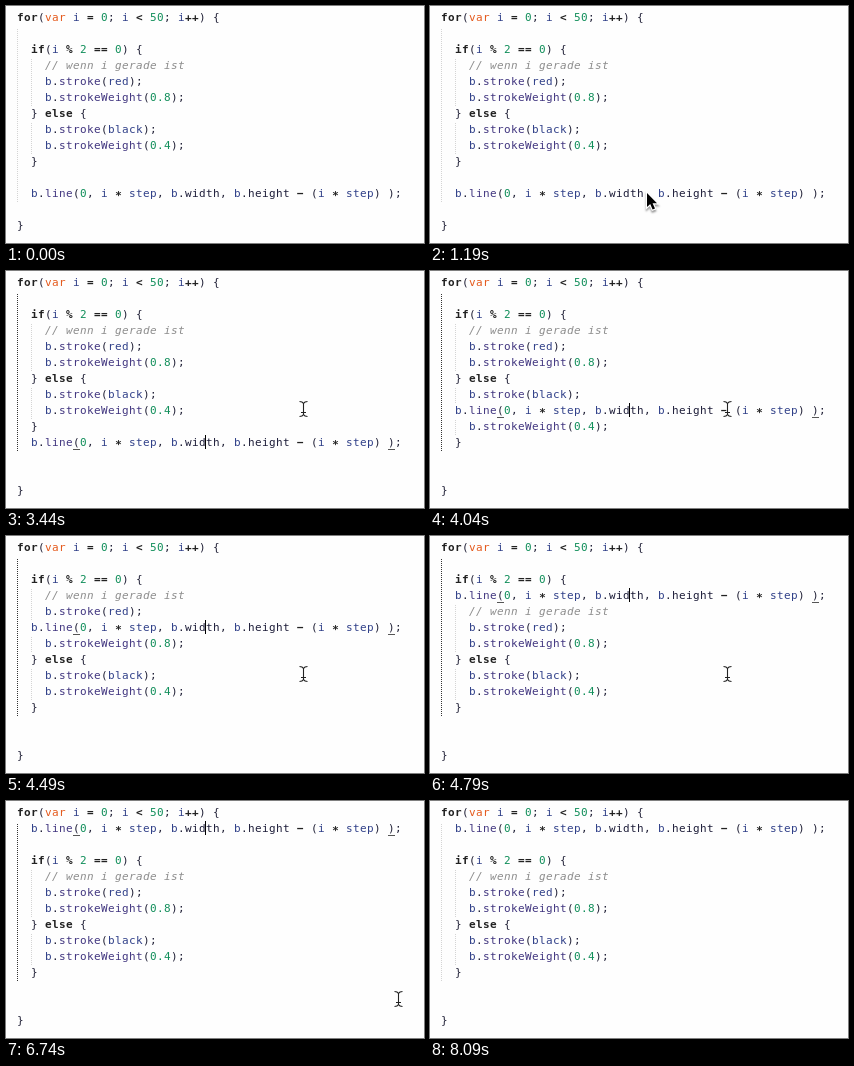
An HTML page with a canvas that plays this animation: 418x237 px, repeating every 8.19 s.

```html
<!DOCTYPE html>
<html lang="de">
<head>
<meta charset="utf-8">
<title>Moving a line of code</title>
<style>
html, body { margin: 0; width: 100%; height: 100%; overflow: hidden; background: #fefefe; }
canvas { display: block; }
</style>
</head>
<body>
<canvas id="stage" width="418" height="237"></canvas>
<script>
const ctx = document.getElementById('stage').getContext('2d');
const LOOP = 8190, STEP = 150, LEFT = 11, CHAR = 7, ROW = 16;
const CLICK = 1940, BLUR = 8090;
const FONT = '11px "DejaVu Sans Mono", monospace';

const block = `for(var i = 0; i < 50; i++) {

  if(i % 2 == 0) {
    // wenn i gerade ist
    b.stroke(red);
    b.strokeWeight(0.8);
  } else {
    b.stroke(black);
    b.strokeWeight(0.4);
  }


}`.split('\n');
const moving = '  b.line(0, i ∗ step, b.width, b.height − (i ∗ step) );';

// Token kinds: name, pattern, colour, font style
const kinds = [
  ['comment', /\/\/.*/, '#8c8c8c', 'italic'],
  ['keyword', /\b(?:for|if|else)\b/, '#222', 'bold'],
  ['storage', /\bvar\b/, '#e4581a', ''],
  ['number', /\d[\d.]*/, '#128f5b', ''],
  ['operator', /[−+∗%=<]+/, '#222', 'bold'],
  ['call', /(?<=\.)\w+(?=\()/, '#40357f', ''],
  ['property', /(?<=\.)\w+/, '#1c1c38', ''],
  ['variable', /[a-z]\w*/, '#2f3f88', ''],
  ['sign', /\S/, '#222238', '']
];
const tokens = new RegExp(kinds.map(([name, re]) => `(?<${name}>${re.source})`).join('|'), 'gi');

// Key presses that lift the line: [first press, repeats]
const presses = [[3440, 1], [3890, 7], [5090, 2]];

// Pointer moves: [start, end, x, y]
const entry = [150, 201];
const glides = [
  [590, 1040, 236, 200], [1040, 1490, 209, 182], [1490, 1640, 200, 187], [CLICK, 2540, 297, 138],
  [6440, 7040, 406, 206], [7040, 7340, 398, 203], [7490, 7940, 390, 246]
];

const arrow = new Path2D('M0 0V14L3.2 11 5.6 16.5 8 15.5 5.6 10.2H10Z');
const beam = new Path2D('M-3.5-7.5Q-.5-7.5 .5-5.5Q1.5-7.5 4.5-7.5M.5-6V6M-3.5 7.5Q-.5 7.5 .5 5.5Q1.5 7.5 4.5 7.5M-2 3.5H3');

const clamp = (v, min, max) => Math.min(max, Math.max(min, v));
const rowTop = r => 4 + ROW * r;

function rect(color, x, y, w, h) {
  ctx.fillStyle = color;
  ctx.fillRect(x, y, w, h);
}

function dots(color, x, from, to) {
  for (let y = from; y < to; y += 2) rect(color, x, y, 1, 1);
}

// Every character sits in its own cell of the editor grid
function drawCode(text, row) {
  for (const m of text.matchAll(tokens)) {
    const [, , color, style] = kinds.find(([name]) => m.groups[name]);
    ctx.font = `${style} ${FONT}`;
    ctx.fillStyle = color;
    [...m[0]].forEach((c, i) => ctx.fillText(c, LEFT + CHAR * (m.index + i), rowTop(row) + 11));
  }
}

function drawGuides(lines, end, active) {
  dots(active ? '#333' : '#d4d4d4', LEFT, 23, end);
  lines.forEach((line, r) => {
    if (line.startsWith('    ')) dots('#d4d4d4', LEFT + 2 * CHAR, rowTop(r) + 1, rowTop(r + 1));
  });
}

function pointerAt(t) {
  let [x, y] = entry;
  for (const [start, end, toX, toY] of glides) {
    const k = 1 - (1 - clamp((t - start) / (end - start), 0, 1)) ** 3;
    x += (toX - x) * k;
    y += (toY - y) * k;
  }
  return [Math.round(x), Math.round(y)];
}

function drawPointer(t) {
  if (t < 590) return;
  const isArrow = t < 1640;
  const shape = isArrow ? arrow : beam;
  ctx.save();
  ctx.translate(...pointerAt(t));
  ctx.strokeStyle = '#fff';
  ctx.lineWidth = 2.4;
  ctx.shadowColor = '#0006';
  ctx.shadowBlur = ctx.shadowOffsetY = isArrow ? 2 : 0;
  ctx.stroke(shape);
  ctx.shadowColor = 'transparent';
  ctx.strokeStyle = '#222';
  ctx.lineWidth = 1.1;
  if (isArrow) {
    ctx.fillStyle = '#000';
    ctx.fill(shape);
  } else ctx.stroke(shape);
  ctx.restore();
}

function draw(time) {
  // The screen refreshes in fixed steps
  const t = Math.max(0, Math.floor((time % LOOP + 10) / STEP) * STEP - 10);
  let row = 11, lastInput = CLICK;
  for (const [first, repeats] of presses) {
    if (t < first) break;
    const count = Math.min(repeats, Math.floor((t - first) / STEP) + 1);
    row -= count;
    lastInput = first + (count - 1) * STEP;
  }
  const lines = block.toSpliced(row, 0, moving);
  const active = t >= CLICK && t < BLUR;
  const top = rowTop(row);

  rect('#fefefe', 0, 0, 418, 237);
  drawGuides(lines, rowTop(row === 11 ? 12 : 11), active);
  lines.forEach(drawCode);
  if (active) {
    for (const ch of [moving.indexOf('('), moving.lastIndexOf(')')])
      rect('#555', LEFT + CHAR * ch, top + 14, CHAR, 1);
    ctx.globalAlpha = clamp(.5 + 1.5 * Math.cos((t - lastInput) / 1300 * 2 * Math.PI), 0, 1);
    rect('#000', 199, top, 1, 14);
    ctx.globalAlpha = 1;
  }
  drawPointer(t);
}

const start = performance.now();
function tick() {
  draw(performance.now() - start);
  requestAnimationFrame(tick);
}
tick();
</script>
</body>
</html>
```
